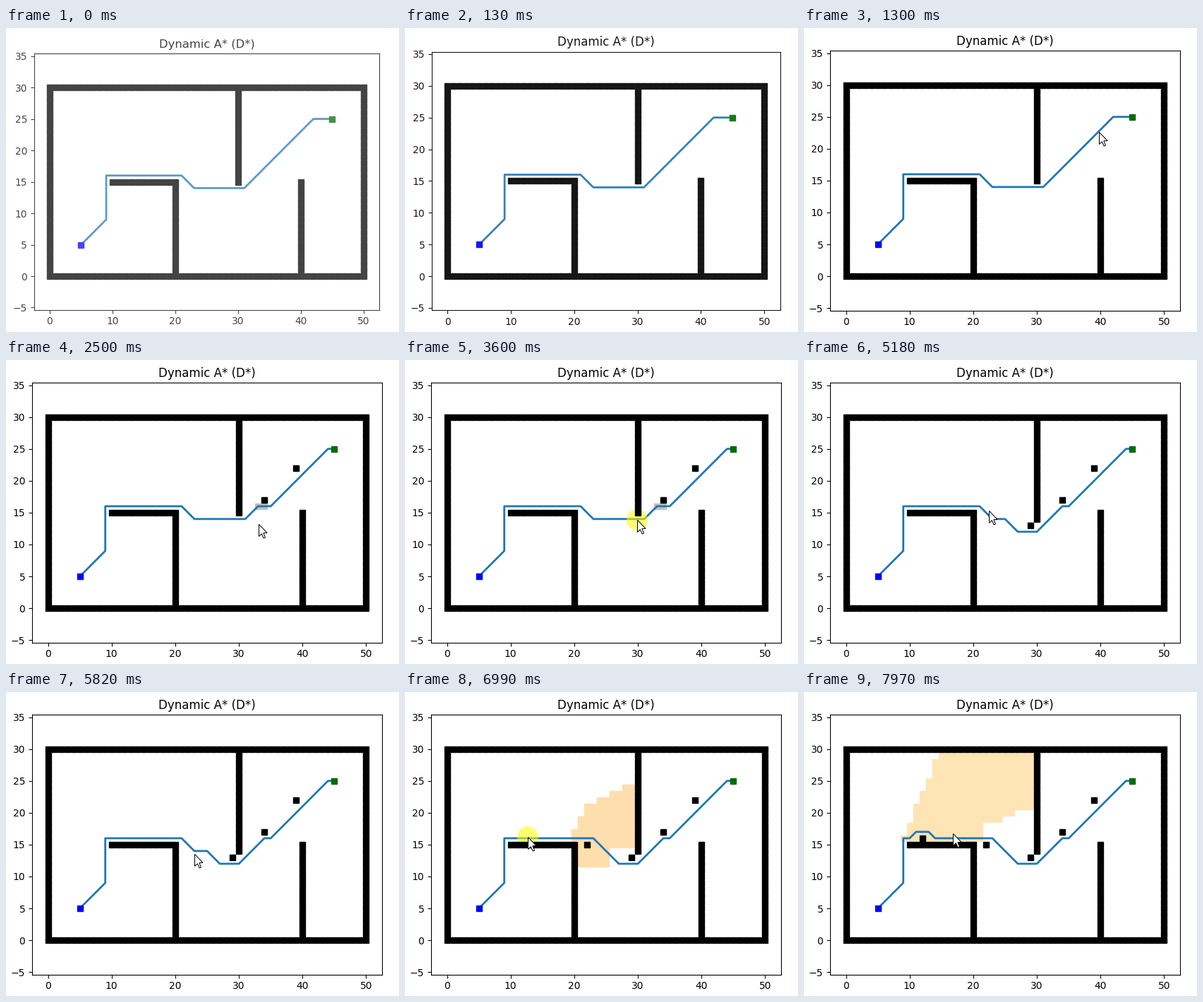
Recreate the animation shown at these times as a matplotlib script. Size 557 by 430 pixels, loop 8000 ms.

```python
import numpy as np
import matplotlib.pyplot as plt
from matplotlib.animation import FuncAnimation
from matplotlib.patches import Circle, Polygon, Rectangle

W, H, DPI = 557, 430, 100
LOOP, STEP = 8000, 25
BOX = (37, 32.24, 496, 367.29)        # axes: left, top, width, height in px
ZOOM0, PIVOT, VEIL0 = 0.9865, (240, 340), 0.27
GLOW_MS = 140


def const(v):
    return lambda x: v


def slope(cap):
    """Upper edge of a wave: steep at first, then one step per two columns."""
    return lambda x: min(2 * x - 2 * cap - 43, x // 2 + cap)


# click time, redraw time, obstacle, detour corners, colour,
# wave: first column, last column, lower edge, upper edge
REPLANS = [
    (1430, 1500, (39, 22), [(38, 21), (40, 21), (44, 25)],
     "lightgray", (38, 39, const(21), const(21))),
    (2220, 2380, (34, 17), [(33, 16), (35, 16), (44, 25)],
     "silver", (33, 34, const(16), const(16))),
    (3520, 3700, (30, 14), [(28, 14), (29, 13), (31, 13), (34, 16)],
     "darkgray", (29, 30, const(13), const(13))),
    (4260, 4400, (29, 13), [(25, 14), (27, 12), (30, 12), (34, 16)],
     "bisque", (25, 29, lambda x: max(12, 38 - x), slope(4))),
    (5330, 5850, (22, 15), [(23, 16), (27, 12)],
     "navajowhite", (20, 29, lambda x: max(96 - 4 * x, 12 if x < 26 else 15),
                     lambda x: min(2 * x - 23, x // 2 + 10))),
    (6890, 7450, (12, 16), [(10, 16), (11, 17), (13, 17), (14, 16)],
     "moccasin", (9, 29, lambda x: 16 if x < 22 else round(0.4 * x + 9.8),
                  lambda x: min(29, round(2.4 * x - 5.8)))),
]

# Pointer moves: begin, end, destination, sideways bow (px)
ENTRY = (321, 387)
MOVES = [
    (410, 1200, (418, 147), (-20, -25)),
    (1600, 2020, (374, 191), (0, 0)),
    (2360, 2960, (329, 226), (0, 32)),
    (3640, 4030, (326, 231), (0, 0)),
    (4360, 5200, (262, 213), (46, 23)),
    (5480, 5700, (267, 229), (0, 0)),
    (5920, 6710, (174, 205), (0, 15)),
    (7100, 7220, (205, 209), (0, 0)),
    (7450, 7540, (211, 200), (0, 0)),
]
ARROW = np.array([(0, 0), (0, 17), (3.8, 13.3), (6.7, 19.5), (9, 18.5),
                  (6.4, 12.2), (11.6, 12)])


def splice(path, detour):
    """Swap the stretch of path covered by the detour."""
    first, last = detour[0][0], detour[-1][0]
    return ([p for p in path if p[0] < first] + detour
            + [p for p in path if p[0] > last])


def wave_cells(x0, x1, low, high):
    return [(x, y) for x in range(x0, x1 + 1)
            for y in range(low(x), high(x) + 1)]


def pointer_at(t):
    at = np.array(ENTRY, float)
    for begin, end, goal, bow in MOVES:
        if t <= begin:
            break
        e = np.sin(np.pi / 2 * min((t - begin) / (end - begin), 1))
        at = at + e * (np.array(goal) - at) + np.sin(np.pi * e) * np.array(bow)
    return np.round(at)


path = [(5, 5), (9, 9), (9, 16), (21, 16), (23, 14), (31, 14), (42, 25),
        (45, 25)]
stages = [(0, path, "white", [])]
for _, when, _, detour, color, wave in REPLANS:
    path = splice(path, detour)
    stages.append((when, path, color, wave_cells(*wave)))

walls = [(x, y) for x in range(51) for y in range(31)
         if x in (0, 50) or y in (0, 30)
         or (x == 20 and y <= 15) or (y == 15 and 10 <= x <= 20)
         or (x == 30 and y >= 15) or (x == 40 and y <= 15)]

fig = plt.figure(figsize=(W / DPI, H / DPI), dpi=DPI, facecolor="white")
ax = fig.add_axes([0, 0, 1, 1])
half = BOX[3] / BOX[2] * 55 / 2
ax.set(xlim=(-2.5, 52.5), ylim=(15 - half, 15 + half),
       xticks=range(0, 51, 10), yticks=range(-5, 36, 5))
title = ax.set_title("Dynamic A* (D*)")


def squares(points, color, z):
    x, y = np.array(points, float).reshape(-1, 2).T
    return ax.plot(x, y, "s", color=color, zorder=z)[0]


def move_points(line, points):
    line.set_data(*np.array(points, float).reshape(-1, 2).T)


seen = squares([], "white", 2)
route, = ax.plot([], [], color="C0", lw=2, zorder=3)
added = squares([], "k", 4)
markers = [seen, added, squares(walls, "k", 4), squares([(5, 5)], "b", 5),
           squares([(45, 25)], "#006c00", 5)]

# Pixel-space layer for pointer and fade
top = fig.add_axes([0, 0, 1, 1], zorder=5)
top.set(xlim=(0, W), ylim=(H, 0))
top.axis("off")
glow = ax.add_patch(Circle((0, 0), 15, fc="yellow", ec="none", alpha=0.55,
                           zorder=3.5, transform=top.transData))
pointer = top.add_patch(Polygon(ARROW, fc="white", ec="black", lw=0.72,
                                joinstyle="miter"))
veil = top.add_patch(Rectangle((0, 0), W, H, fc="white", ec="none"))


def zoom(s):
    left, up = (c + s * (p - c) for p, c in zip(BOX, PIVOT))
    w, h = BOX[2] * s, BOX[3] * s
    ax.set_position([left / W, 1 - (up + h) / H, w / W, h / H])
    ax.tick_params(labelsize=10 * s, length=3.5 * s, pad=3.5 * s)
    title.set_fontsize(12 * s)
    route.set_linewidth(2 * s)
    for m in markers:
        m.set_markersize(6 * s)


def update(i):
    t = i * STEP
    p = min(max((t - 25) / 150, 0), 1)
    if t <= 200:
        zoom(ZOOM0 + (1 - ZOOM0) * p)
    veil.set_alpha(VEIL0 * (1 - p))
    veil.set_visible(p < 1)

    k = sum(t >= stage[0] for stage in stages) - 1
    _, corners, color, cells = stages[k]
    move_points(route, corners)
    move_points(seen, cells)
    seen.set_color(color)
    move_points(added, [r[2] for r in REPLANS[:k]])

    at = pointer_at(t)
    pointer.set_xy(ARROW + at + 0.5)
    pointer.set_visible(t >= MOVES[0][0])
    glow.center = tuple(at)
    glow.set_visible(any(0 <= t - r[0] < GLOW_MS for r in REPLANS))
    return []


anim = FuncAnimation(fig, update, frames=LOOP // STEP, interval=STEP,
                     repeat=True, repeat_delay=0, init_func=lambda: [])
plt.show()
```
